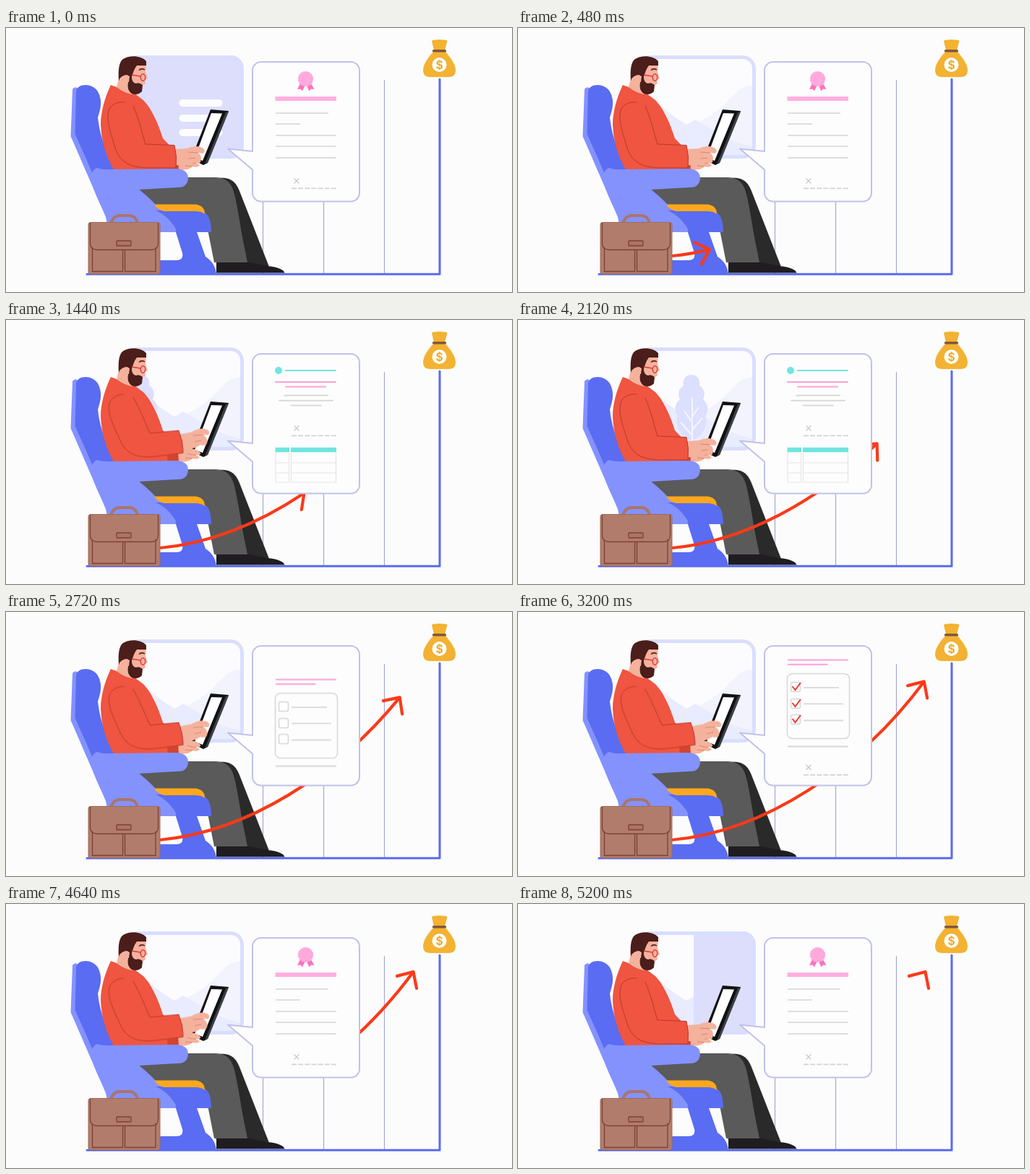
An HTML page without scripts for the animation above (5.24 s loop, 700x366 px).

```html
<!DOCTYPE html>
<html lang="en">
<head>
<meta charset="utf-8">
<title>Paperwork on the go</title>
<style>
html, body { margin: 0; width: 100%; height: 100%; overflow: hidden; background: #fcfcfc; }
svg { display: block; width: 100vw; height: 100vh; }
.scenery, .pages, .arm, .trail, .tip, .tick { animation: 5240ms linear infinite; }

/* the view jumps 85px every 40ms */
.scenery { animation-name: ride; animation-timing-function: steps(131); }
@keyframes ride { to { transform: translateX(-11135px); } }

.pages { animation-name: scroll; animation-timing-function: ease-in-out; }
@keyframes scroll {
  0%, 12.37% { transform: translateY(0); }
  22.29%, 44.27% { transform: translateY(-252px); }
  54.2%, 76.3% { transform: translateY(-504px); }
  86.26%, 100% { transform: translateY(-756px); }
}

.arm { transform-origin: 165px 112px; animation-name: reach; animation-timing-function: ease-in-out; }
@keyframes reach {
  0%, 8.4%, 14.7% { transform: rotate(0deg); }
  2%, 6% { transform: rotate(-1.5deg); }
  4% { transform: rotate(.5deg); }
  17.4%, 29.4% { transform: rotate(-7.5deg); }
  32.4%, 35.9%, 40.1%, 46.8% { transform: rotate(0deg); }
  37%, 39% { transform: rotate(-1.5deg); }
  49.4%, 61.5% { transform: rotate(-7.5deg); }
  64.5%, 67.9%, 72.1%, 78.8% { transform: rotate(0deg); }
  69%, 71% { transform: rotate(-1.5deg); }
  81.5%, 93.5% { transform: rotate(-7.5deg); }
  96.6%, 100% { transform: rotate(0deg); }
}

/* gap, then the visible stretch */
.trail { animation-name: trail; }
@keyframes trail {
  0%, 3.05% { stroke-dasharray: 0 0 0 200; }
  17.56% { stroke-dasharray: 0 0 29.3 200; }
  27.48% { stroke-dasharray: 0 0 50.5 200; }
  40.46% { stroke-dasharray: 0 0 76 200; }
  53.44% { stroke-dasharray: 0 0 95 200; }
  61.07% { stroke-dasharray: 0 0 99.3 200; }
  64.9%, 68.8% { stroke-dasharray: 0 0 100 200; }
  79.4% { stroke-dasharray: 0 36.3 63.7 200; }
  97.7%, 100% { stroke-dasharray: 0 100 0 200; }
}
.tip {
  offset-path: path("M213 316C342 304 475 215 563.5 94");
  offset-rotate: auto -4deg;
  animation-name: tip;
}
@keyframes tip {
  0%, 3.05% { offset-distance: 0%; visibility: hidden; }
  3.06% { offset-distance: 0%; visibility: visible; }
  17.56% { offset-distance: 29.3%; }
  27.48% { offset-distance: 50.5%; }
  40.46% { offset-distance: 76%; }
  53.44% { offset-distance: 95%; }
  61.07% { offset-distance: 99.3%; }
  64.9%, 100% { offset-distance: 100%; visibility: visible; }
}

.tick { stroke: #ec3b35; stroke-width: 2; stroke-dasharray: 20; animation-name: tick; }
.tick + .tick { animation-delay: 80ms; }
.tick + .tick + .tick { animation-delay: 160ms; }
@keyframes tick {
  0%, 55% { stroke-dashoffset: 20; }
  56.5%, 95% { stroke-dashoffset: 0; }
  95.1%, 100% { stroke-dashoffset: 20; }
}

.blue { fill: #5a6cf2; }
.pale { fill: #8492fd; }
.skin { fill: #f4b29d; }
.hair { fill: #4b1d1b; }
.pink { stroke: #fd9fda; }
.teal { stroke: #70e5de; }
</style>
</head>
<body>
<svg viewBox="0 0 700 366" preserveAspectRatio="none" fill="none">
<defs>
  <clipPath id="pane"><rect x="165" y="38" width="164" height="143" rx="18"/></clipPath>
  <clipPath id="sheet"><rect x="345" y="52" width="140" height="182"/></clipPath>
  <path id="half" d="M0 76C9 76 13 84 11 91C19 96 19 104 16 110C24 117 24 127 19 133C23 144 18 161 0 167Z"/>
  <g id="tree">
    <g fill="#dcdffd"><use href="#half"/><use href="#half" transform="scale(-1 1)"/></g>
    <path d="M1 107V178M1 134L10 121M1 142L-10 126M1 152L15 136M1 160L-15 142" stroke="#f5f6fe" stroke-width="2"/>
  </g>
  <g id="board">
    <rect x="158" y="36" width="224" height="147" fill="#dcdefc"/>
    <path d="M244.500 104H294.500M244.500 125H294.500M244.500 145H294.500" stroke="#fdfdff" stroke-width="10" stroke-linecap="round"/>
  </g>
  <g id="sign">
    <path d="M398.500 -3.500l7 7m0 -7l-7 7" stroke="#c9c9cd" stroke-width="1.300"/>
    <path d="M395 10.300H457" stroke="#d3d3d7" stroke-width="1.700" stroke-dasharray="7 2.150"/>
  </g>
  <g id="award">
    <path d="M407 77L403 85L407.500 84.500L410 87.500L414 79ZM422 77L426.500 85L422 84.500L419.500 87.500L415.500 79Z" fill="#fb74bd"/>
    <circle cx="414.500" cy="70.500" r="10" fill="#ffa9dc"/>
    <circle cx="414.500" cy="70.500" r="10" stroke="#ffa9dc" stroke-width="1.600" stroke-dasharray="2.500 1.430"/>
    <path d="M372.500 98H457" stroke="#ffafdf" stroke-width="6"/>
    <path d="M373 118H446M373 133H407M373 149H457M373 164H457M373 180H457" stroke="#d5d5d9" stroke-width="1.600"/>
    <use href="#sign" y="212"/>
  </g>
  <rect id="box" x="377.500" y="-6.500" width="13" height="13" rx="2.500"/>
</defs>

<!-- window -->
<g clip-path="url(#pane)">
  <rect x="165" y="38" width="164" height="143" fill="#fcfcfe"/>
  <path d="M329 79C318 80 310 81 303 88L284 107C272 119 258 126 244 133L200 178H329Z" fill="#f2f3fd"/>
  <path d="M165 84L196 107C210 119 220 126 233 134L245 127C262 136 276 147 300 158L329 166V181H165Z" fill="#e9ecfe"/>
  <g class="scenery">
    <use href="#board"/>
    <use href="#tree" x="3247"/>
    <use href="#tree" x="4745"/>
    <use href="#tree" x="6243"/>
    <use href="#tree" x="7741"/>
    <use href="#board" x="11135"/>
  </g>
  <rect x="167.500" y="40.500" width="159" height="138" rx="15.500" stroke="#dadefe" stroke-width="5"/>
</g>

<!-- chart frame -->
<path d="M355.500 238V340M439.500 238V340M523.500 72V340" stroke="#a4a8d4" stroke-width="1.200"/>
<path d="M112 341.300H600V71" stroke="#596bf0" stroke-width="3" stroke-linecap="round" stroke-linejoin="round"/>

<!-- chair back and base -->
<path class="blue" d="M234 280H263L276 317Q290 326 291 342H213V322H236Q246 322 244 312Z"/>
<path class="pale" d="M92 85Q95 80 100 84L104 148L126 196L190 222L222 254L236 283H200L190 300H146L138 262L89.500 150Z"/>
<path class="blue" d="M97 88C98 77 119 75 127 88C134 101 131 112 127 124C129 140 132 152 137 165L156 198L121 206C114 187 104 166 95.500 147Z"/>

<!-- legs -->
<path d="M292 208C312 206 318 214 323 226L364 331L333 327Z" fill="#2a2a2a"/>
<path d="M291 325H338L361 330Q383 332 385.500 339.500H291Z" fill="#1f1d20"/>
<path d="M184 224L206 207H290C306 208 312 215 316 230C321 252 324 272 327 290L334 325H288L275 259Q273 247 259 246H208Q196 233 184 224Z" fill="#5a5a5a"/>

<!-- seat -->
<path class="blue" d="M207 253H268C279 255 284 264 284 283H236Q228 262 207 253Z"/>
<path d="M203 244.500H262Q275 246 275 258Q270 254 262 254H218Q210 251 203 244.500Z" fill="#fda81c"/>

<!-- torso and head -->
<path d="M145 79C136 98 131 117 131 134C132 157 138 178 150 198H240L241 178L217 153C210 130 200 110 190 100L178 91Z" fill="#ef5540"/>
<path class="skin" d="M157 66L153 82Q163 90 175 92L188 80L193 77L192 72L196 70L193 61L194 51L176 47Z"/>
<path class="hair" d="M156 73C155 60 156 47 162 43C170 37 188 38 194 46V52H181C177 57 176 62 174 68C174 73 176 76 180 77Q184 75 189 79L188 88Q182 94 174 91Q167 86 169 76L168 65Q159 65 156 73Z"/>
<path class="skin" d="M170 75Q162 75 163 68Q165 63 171 67Z"/>
<path d="M174 65L186 67" stroke="#de3942" stroke-width="1.400"/>
<ellipse cx="189.500" cy="68.500" rx="3.200" ry="4.700" stroke="#de3942" stroke-width="1.400"/>
<path d="M184 58.500Q188 55 192 58" stroke="#4b1d1b" stroke-width="1.500"/>

<!-- tablet and hands -->
<path d="M283 113L308 115L279 187L273 190L256 182Z" fill="#111114"/>
<path d="M304 117L308 116L279 187L275 189Z" fill="#3c4146"/>
<path d="M284 118L299 118.500L272 184L261 180Z" fill="#fff"/>
<path d="M222 180L239 179L243 196H224Z" fill="#d2442f"/>
<path class="skin" d="M238 182C247 177 256 178 264 180L269 184Q270 188 262 187L268 190Q266 194 258 192Q252 198 239 196Z"/>
<path d="M251 185Q258 188 263 187M248 191L258 192" stroke="#d88670"/>
<g class="arm">
  <path class="skin" d="M232 168L250 167C259 163 267 163 273 167Q277 172 272 174L266 173Q272 178 269 186Q265 189 260 186Q254 191 234 190Z"/>
  <path d="M252 172L265 173M253 181L262 180" stroke="#d88670"/>
  <path d="M143 112C150 101 171 98 178 111C184 126 188 145 193 161L233 162.500Q237 178 235 194L188 195C165 193 155 184 150 166C145 148 136 128 143 112Z" fill="#ef5540"/>
  <path d="M176 108C184 126 188 145 193 161L233 162.500Q237 178 235 194L192 194C168 192 157 184 151 166C146 148 137 128 143 112C147 105 155 102 164 103" stroke="#b9382a"/>
</g>

<!-- armrest -->
<path class="pale" d="M127 194Q134 197 146 196L238 195Q252 197 252 208Q251 221 238 221L184 224L207 246L190 262H140Q117 222 118 204Q120 195 127 194Z"/>

<!-- rising arrow -->
<g stroke="#fc3918" stroke-width="4.200" stroke-linejoin="round">
  <path class="trail" pathLength="100" d="M213 316C342 304 475 215 563.500 94"/>
  <path class="tip" d="M-17 -16L0 0L-17 16" stroke-linecap="round"/>
</g>

<!-- briefcase -->
<g stroke="#7b4136" stroke-width="1.300">
  <path d="M145 270Q149 260 157 260H171Q179 260 182 270" stroke="#ad7567" stroke-width="4"/>
  <rect x="114" y="269.500" width="99" height="71.500" rx="3" fill="#b27c6d" stroke="#a06a5d" stroke-width="1"/>
  <path d="M116.500 270V299Q117 307 125 307.500H202Q210 307 210.500 299V270"/>
  <path d="M119.500 304V337.500H161.500V308M164.500 308V337.500H207V304"/>
  <rect x="153" y="295" width="20" height="7" rx="1" fill="#ab7465"/>
</g>

<!-- document bubble -->
<path d="M353 47H477A12 12 0 0 1 489 59V228.500A12 12 0 0 1 477 240.500H353A12 12 0 0 1 341 228.500V196.500L307 167.500L341 171V59A12 12 0 0 1 353 47Z" fill="#fdfdfd" stroke="#bfc2e8" stroke-width="2" stroke-linejoin="round"/>
<g clip-path="url(#sheet)">
  <g class="pages">
    <use href="#award"/>
    <g transform="translate(0 252)">
      <circle cx="377" cy="70" r="5" fill="#70e5de"/>
      <g stroke-width="2" stroke-linecap="round">
        <path class="teal" d="M387 70H456"/>
        <path class="pink" d="M373 86H456M387 92.500H442"/>
        <path d="M385 104.500H445M378 111.800H452M395 118.500H436" stroke="#d9d9dd"/>
      </g>
      <use href="#sign" y="150"/>
      <path class="teal" d="M372.500 180H392M394 180H457" stroke-width="6.500"/>
      <path d="M373 184V225H391.500V184M394.500 184V225H456.500V184M373 198H391.500M394.500 198H456.500M373 212H391.500M394.500 212H456.500" stroke="#e6e6e9" stroke-width="1.200"/>
    </g>
    <g transform="translate(0 504)">
      <path class="pink" d="M373 66.500H457M373 72.700H428.500" stroke-width="2"/>
      <g stroke="#d7d7da" stroke-width="1.500">
        <rect x="372.500" y="85.500" width="86" height="90" rx="7"/>
        <use href="#box" y="104"/><use href="#box" y="127"/><use href="#box" y="149"/>
        <path d="M395 104.800H444M395 127.300H450M395 150.300H450M373 186.500H457" stroke-width="1.800"/>
      </g>
      <path class="tick" d="M379.500 103l4 5L391 98"/>
      <path class="tick" d="M379.500 126l4 5L391 121"/>
      <path class="tick" d="M379.500 148l4 5L391 143"/>
      <use href="#sign" y="215.500"/>
    </g>
    <use href="#award" y="756"/>
  </g>
</g>

<!-- money bag -->
<path d="M589 18Q590 16 594 16.500Q599.500 15.500 605 16.500Q610 16 610.500 18L607 31H592Z" fill="#f3b231"/>
<path d="M591 33H608C615 41 622 50 622 59Q622 68 612 68H587Q577 68 577 59C577 50 584 41 591 33Z" fill="#f3b231"/>
<path d="M591.500 31.800H607.500" stroke="#80583f" stroke-width="3.400" stroke-linecap="round"/>
<circle cx="599.500" cy="51" r="10" fill="#fff"/>
<text x="599.500" y="56.700" text-anchor="middle" font-family="Inter, Arial, sans-serif" font-size="15.500" font-weight="700" fill="#f0ac25">$</text>
</svg>
</body>
</html>
```
